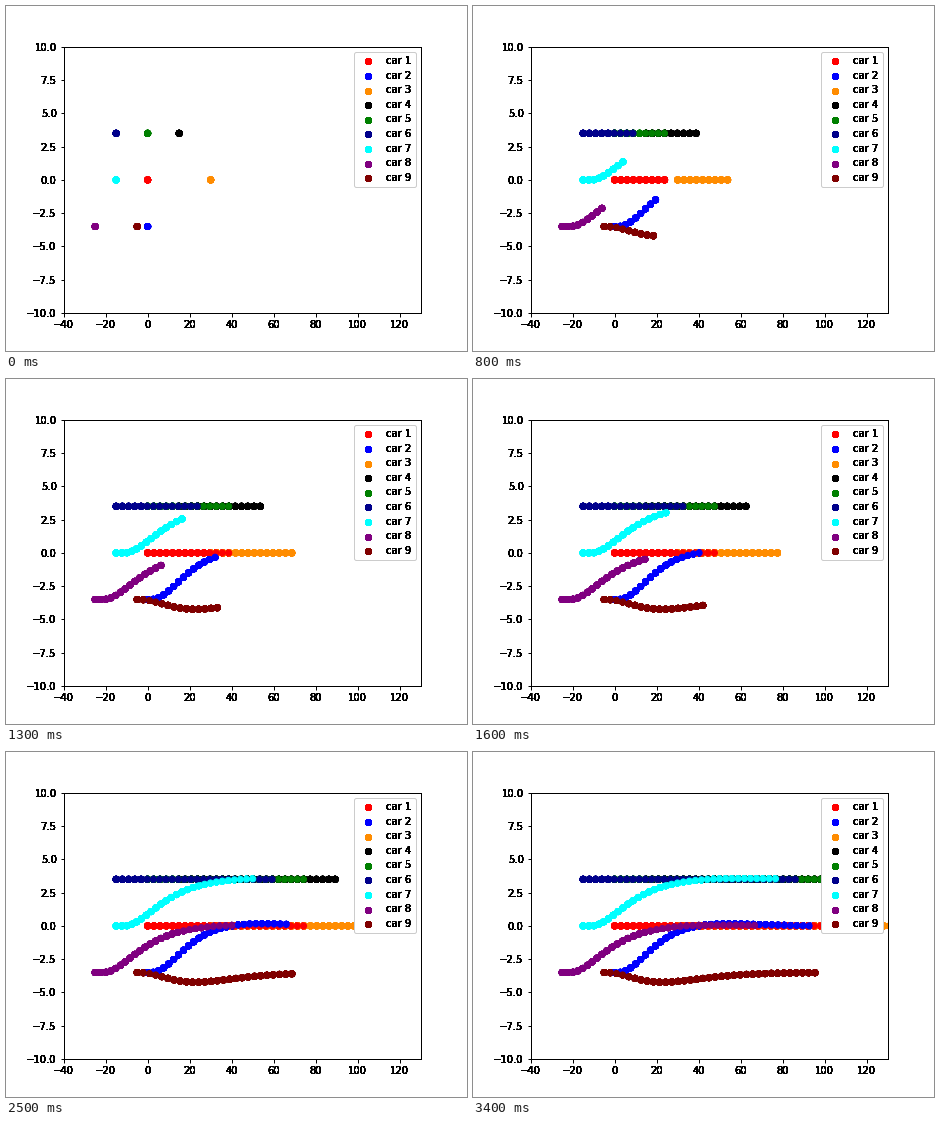
Recreate the animation shown at these times as a matplotlib script. Size 461x345 px, loop 3500 ms.

```python
import numpy as np
import matplotlib.pyplot as plt
from matplotlib.animation import FuncAnimation

WIDTH, HEIGHT, DPI = 461, 345, 72
STEPS, INTERVAL = 35, 100
CRUISE = 2.97  # distance per step
LANE = 3.5     # lane width

plt.rcParams.update({
    "font.family": "DejaVu Sans",
    "font.size": 10,
    "axes.linewidth": 1.0,
    "xtick.major.width": 1.0,
    "ytick.major.width": 1.0,
    "legend.framealpha": 1.0,
    "legend.labelspacing": 0.463,
})

t = np.arange(STEPS)


def advance(lag=0.0):
    """Distance covered, losing `lag` in total while steering."""
    return CRUISE * t - lag * (1 - np.exp(-(t / 10) ** 1.5))


def change_lane(delay, decay, freq):
    """Damped swing into the next lane with a slight overshoot."""
    u = np.maximum(t - delay, 0)
    swing = np.cos(freq * u) + decay / freq * np.sin(freq * u)
    return LANE * (1 - np.exp(-decay * u) * swing)


def dip(depth, peak):
    """Drift aside, deepest at step `peak`, then ease back."""
    u = t / peak
    return -depth * (u * np.exp(1 - u)) ** 3


straight = advance(), np.zeros(STEPS)
merge = advance(9.4), change_lane(1.5, 0.15, 0.115)
quick_merge = advance(8.4), change_lane(0.7, 0.155, 0.155)
swerve = advance(0.6), dip(0.73, 9.5)

# colour, start x, start y, manoeuvre
CARS = [
    ("red", 0, 0, straight),
    ("blue", 0, -LANE, quick_merge),
    ("darkorange", 30, 0, straight),
    ("black", 15, LANE, straight),
    ("green", 0, LANE, straight),
    ("darkblue", -15, LANE, straight),
    ("cyan", -15, 0, merge),
    ("purple", -25, -LANE, merge),
    ("maroon", -5, -LANE, swerve),
]
colors = [car[0] for car in CARS]
# Shape (step, car, xy): later steps are painted over earlier ones
paths = np.stack([np.column_stack((x + dx, y + dy))
                  for _, x, y, (dx, dy) in CARS], axis=1)


def harden(artist, times):
    """Paint an artist several times over for crisp, heavy edges."""
    draw = artist.draw

    def repeat(renderer):
        for _ in range(times):
            draw(renderer)

    artist.draw = repeat


fig, ax = plt.subplots(figsize=(WIDTH / DPI, HEIGHT / DPI), dpi=DPI)
# Default margins of a 6.4 x 4.8 inch figure
fig.subplots_adjust(left=0.8 * DPI / WIDTH, right=5.76 * DPI / WIDTH,
                    bottom=0.528 * DPI / HEIGHT, top=4.224 * DPI / HEIGHT)
ax.set_xlim(-40, 130)
ax.set_ylim(-10, 10)

dots = ax.scatter(paths[0, :, 0], paths[0, :, 1], c=colors)
keys = [ax.scatter([], [], color=c, label=f"car {n}")
        for n, c in enumerate(colors, 1)]
legend = ax.legend(handles=keys, loc="upper right")

for text in [*ax.get_xticklabels(), *ax.get_yticklabels(), *legend.get_texts()]:
    harden(text, 16)
for marker in [dots, *legend.legend_handles]:
    harden(marker, 24)


def update(step):
    dots.set_offsets(paths[:step + 1].reshape(-1, 2))
    return [dots]


anim = FuncAnimation(fig, update, frames=STEPS, interval=INTERVAL,
                     repeat=True, repeat_delay=0, blit=False)
plt.show()
```
